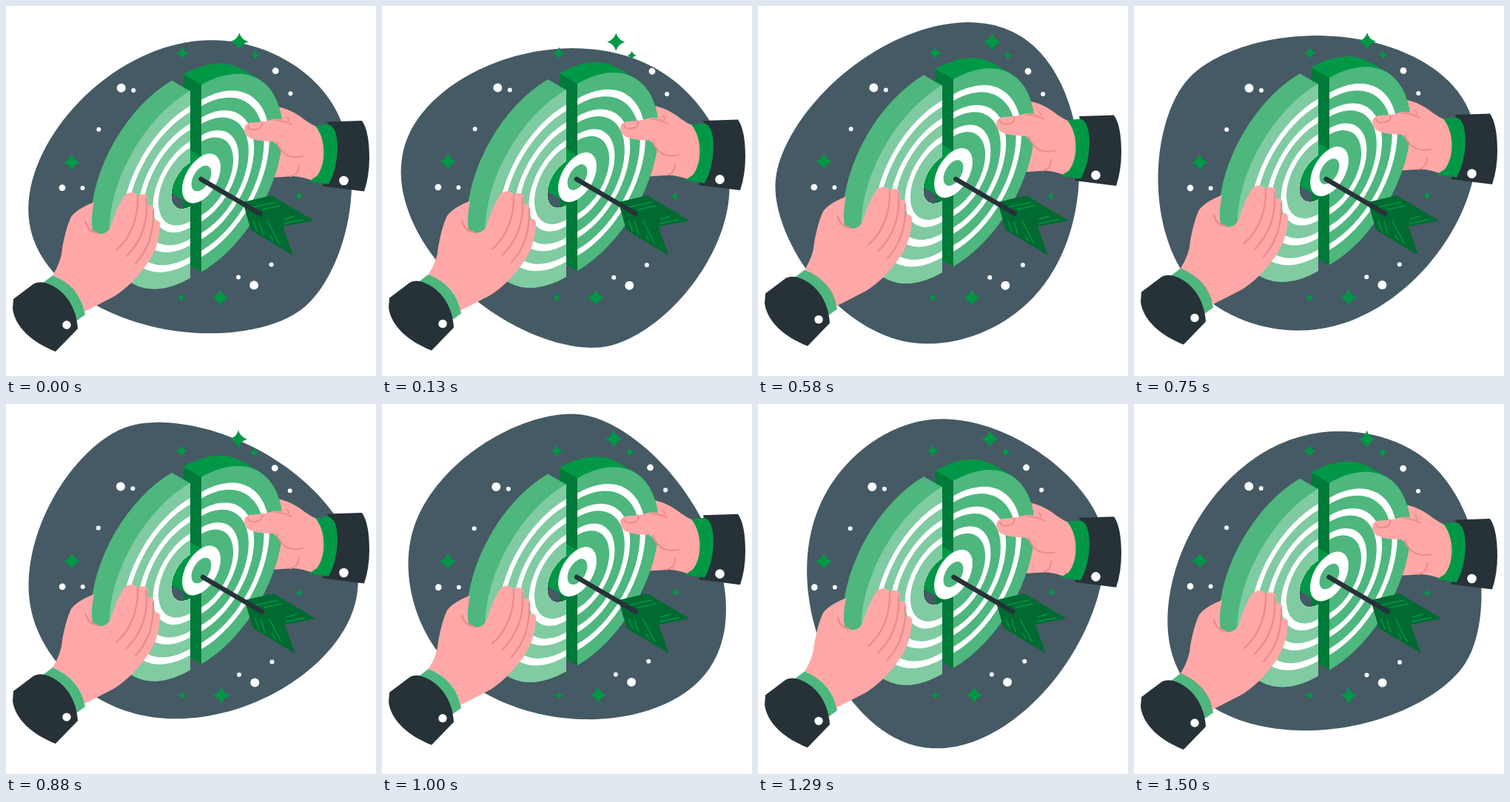
Write an HTML page with a canvas that moves like this. It is 500 px wide and 500 px high and loops after 1540 ms.

```html
<!DOCTYPE html>
<html lang="en">
<head>
<meta charset="utf-8">
<title>Target</title>
<style>
html, body { margin: 0; width: 100%; height: 100%; overflow: hidden; background: #fff; }
canvas { display: block; width: 500px; height: 500px; }
</style>
</head>
<body>
<canvas id="stage"></canvas>
<script>
const canvas = document.getElementById('stage');
const ctx = canvas.getContext('2d');
const ratio = window.devicePixelRatio || 1;
canvas.width = canvas.height = 500 * ratio;

const LOOP = 1540, STEP = 1000 / 24, CYCLE = 38;
const { PI, sin, cos, floor, abs } = Math;

const GREEN = '#009846', MID = '#4db77e', LIGHT = '#80cba2', DEEP = '#007a38', VANE = '#006a31';
const SLATE = '#455a64', DARK = '#263238', SKIN = '#ffa8a7', CREASE = '#ed8b8b', WHITE = '#fff';

// The board is a circle in an isometric plane; DEPTH points to its back.
const LEFT = [249, 241], RIGHT = [264, 233], RADIUS = 126.5, HUB = 30;
const DEPTH = [-24.5, -14];

const sparkles = [[315, 48, 12], [238, 63.5, 8], [336.5, 66, 6], [89, 211.5, 11.5],
  [396, 256, 5.5], [290, 394, 11.5], [237.5, 394, 5.5]];
const dots = [[155.5, 111, 6], [172, 114, 3], [364, 87.3, 4.4], [384.3, 118, 3], [125.2, 167, 3],
  [76, 246, 4.4], [103.6, 246.2, 3], [358.8, 349.2, 3], [314.3, 366.3, 3], [335.4, 377, 6]];
const shake = [0, -1, 2, -4, 4, -4, 4, -4, 2, -1, 0];

function fill(path, color) {
  ctx.fillStyle = color;
  ctx.fill(new Path2D(path));
}

function stroke(path, color, width) {
  ctx.strokeStyle = color;
  ctx.lineWidth = width;
  ctx.lineCap = ctx.lineJoin = 'round';
  ctx.stroke(new Path2D(path));
}

function dot(x, y, r, color) {
  ctx.fillStyle = color;
  ctx.beginPath();
  ctx.arc(x, y, r, 0, 2 * PI);
  ctx.fill();
}

// Adds an isometric arc to the current path.
function isoArc([x, y], r, from, to) {
  ctx.save();
  ctx.transform(0.866, -0.5, 0, 1, x, y);
  ctx.moveTo(r * cos(from), r * sin(from));
  ctx.arc(0, 0, r, from, to);
  ctx.restore();
}

function isoFill(center, r, color, from = 0, to = 2 * PI) {
  ctx.fillStyle = color;
  ctx.beginPath();
  isoArc(center, r, from, to);
  ctx.fill();
}

const leftHalf = (c, r, color) => isoFill(c, r, color, PI / 2, 1.5 * PI);
const rightHalf = (c, r, color) => isoFill(c, r, color, -PI / 2, PI / 2);

function extrude(half, [x, y], r, color) {
  for (let k = 0; k <= 30; k++) half([x + DEPTH[0] * k / 30, y + DEPTH[1] * k / 30], r, color);
}

function face(half, center, color) {
  half(center, RADIUS, color);
  for (const r of [106.2, 82.2, 58.2]) {
    half(center, r, WHITE);
    half(center, r - 8.5, color);
  }
}

// Outline from its support function: distance of the tangent in each direction.
function blobPath() {
  const terms = [[6.55, 9.65], [10.2, -5.05], [-7.4, 4.1], [-1.3, -2.2], [-0.4, -1.3]];
  const path = new Path2D();
  for (let i = 0; i < 240; i++) {
    const a = i / 240 * 2 * PI;
    let h = 209.6, slope = 0;
    terms.forEach(([c, s], j) => {
      const n = j + 1;
      h += c * cos(n * a) + s * sin(n * a);
      slope += n * (s * cos(n * a) - c * sin(n * a));
    });
    path.lineTo(h * cos(a) - slope * sin(a), h * sin(a) + slope * cos(a));
  }
  path.closePath();
  return path;
}
const blob = blobPath();

function drawBlob(turn) {
  ctx.save();
  ctx.translate(250, 240);
  ctx.rotate(turn);
  ctx.fillStyle = SLATE;
  ctx.fill(blob);
  ctx.restore();
}

function drawSky(degrees) {
  ctx.save();
  ctx.translate(236, 221.5);
  ctx.rotate(degrees * PI / 180);
  ctx.translate(-236, -221.5);
  for (const [x, y, r] of sparkles) {
    const q = r * 0.23;
    fill(`M${x} ${y - r}Q${x + q} ${y - q} ${x + r} ${y}Q${x + q} ${y + q} ${x} ${y + r}` +
      `Q${x - q} ${y + q} ${x - r} ${y}Q${x - q} ${y - q} ${x} ${y - r}Z`, GREEN);
  }
  for (const [x, y, r] of dots) dot(x, y, r, WHITE);
  ctx.restore();
}

function drawRightArm() {
  fill('M434 156.5L481 155C488 165 491 182 491 205Q491 230 484 250.5L428 243.5Q446 200 434 156.5Z', DARK);
  fill('M366 136C380 138 393 145 404 154Q412 160 422 164C431 176 432 192 430 210' +
    'Q427 226 414 236Q402 231 388 230Q374 231 358 232Z', SKIN);
  fill('M418 162L435 160C444 162 448 174 448 193Q447 222 436 241L409 237L420 230' +
    'C433 214 433 180 418 162Z', GREEN);
  stroke('M380 150Q383 154 381 159M396 215Q396 228 384 230', CREASE, 2);
  dot(456.5, 236, 6.3, WHITE);
}

function drawThumb() {
  fill('M322 166Q322 159 332 157.5Q350 157 362 152.5Q378 152 388 160L408 180L398 204' +
    'Q377 203 368 191Q366 186 361 183C349 183 337 182 329 178Q322 174 322 166Z', SKIN);
  stroke('M362 154Q376 155 386 160M366 184Q375 209 401 203' +
    'M327 162Q328 168 336 167Q348 166 346 157', CREASE, 2);
}

function drawBoard() {
  extrude(rightHalf, RIGHT, RADIUS, GREEN);
  face(rightHalf, RIGHT, MID);
  fill('M239.5 92.5L264 106.5V359.5L239.5 345.5Z', DEEP);
  extrude(leftHalf, RIGHT, HUB, GREEN);

  ctx.save();
  ctx.beginPath();
  ctx.rect(0, 0, 500, 500);
  isoArc(LEFT, HUB, PI / 2, 1.5 * PI);
  ctx.clip('evenodd');
  extrude(leftHalf, LEFT, RADIUS, MID);
  face(leftHalf, LEFT, LIGHT);
  ctx.restore();

  isoFill(RIGHT, HUB, WHITE);
  isoFill(RIGHT, 15.5, MID);
}

function drawLeftArm() {
  fill('M50 374L63 364Q101 380 107 417L96 425Z', MID);
  fill('M63 364Q75 345 76 327C79 310 83 295 88 285Q96 274 119 265Q114 290 117 303' +
    'Q122 309 130 308Q138 306 141 299C147 281 153 266 160 256Q168 249 176 254L178 257' +
    'Q183 252 190 256Q193 262 192 270Q198 267 200 274L200 291Q206 287 208 294' +
    'C208 312 203 328 195 342C178 368 161 383 147 392Q126 403 106 413Q100 380 63 364Z', SKIN);
  stroke('M108 292Q111 305 124 307M178 257C179 284 170 312 149 330' +
    'M190 261C192 292 183 318 163 338M199 276C200 306 191 331 175 348', CREASE, 2.4);
  fill('M10 396L38 375Q44 372 53 374C76 381 95 403 97 436L67 467C36 455 12 434 9 409Z', DARK);
  dot(82, 431, 5.7, WHITE);
}

function drawArrow() {
  fill('M320 265L359 256L416 290L374 298L388 337L331 303Z', VANE);
  stroke('M334 272L365 265M347 275L370 270M377 288L390 284M376 294L401 289' +
    'M334 290L339 304M342 291L347 308M353 290L369 321M357 310L361 317', GREEN, 1.4);
  stroke('M263.5 234L343 280.5', DARK, 6.5);
}

function draw(ms) {
  const frame = floor((ms % LOOP + 4.9) / STEP);
  const phase = (frame + 1) / CYCLE;
  const lift = 10 * (1 - abs(1 - 2 * phase));
  const sway = phase < 0.25 ? 4 * phase : phase < 0.75 ? 2 - 4 * phase : 4 * phase - 4;
  const key = floor(phase * 10);
  const jolt = shake[key] + (shake[key + 1] - shake[key]) * (phase * 10 - key);

  ctx.setTransform(ratio, 0, 0, ratio, 0, 0);
  ctx.fillStyle = WHITE;
  ctx.fillRect(0, 0, 500, 500);
  drawBlob(frame / CYCLE * 2 * PI);
  drawSky(sway);

  ctx.save();
  ctx.translate(0, 0.5 - lift);
  drawRightArm();
  drawBoard();
  drawThumb();
  drawLeftArm();
  ctx.restore();

  ctx.save();
  ctx.translate(jolt + 0.25, 0);
  drawArrow();
  ctx.restore();
}

const start = performance.now();
function tick() {
  draw(performance.now() - start);
  requestAnimationFrame(tick);
}
tick();
</script>
</body>
</html>
```
